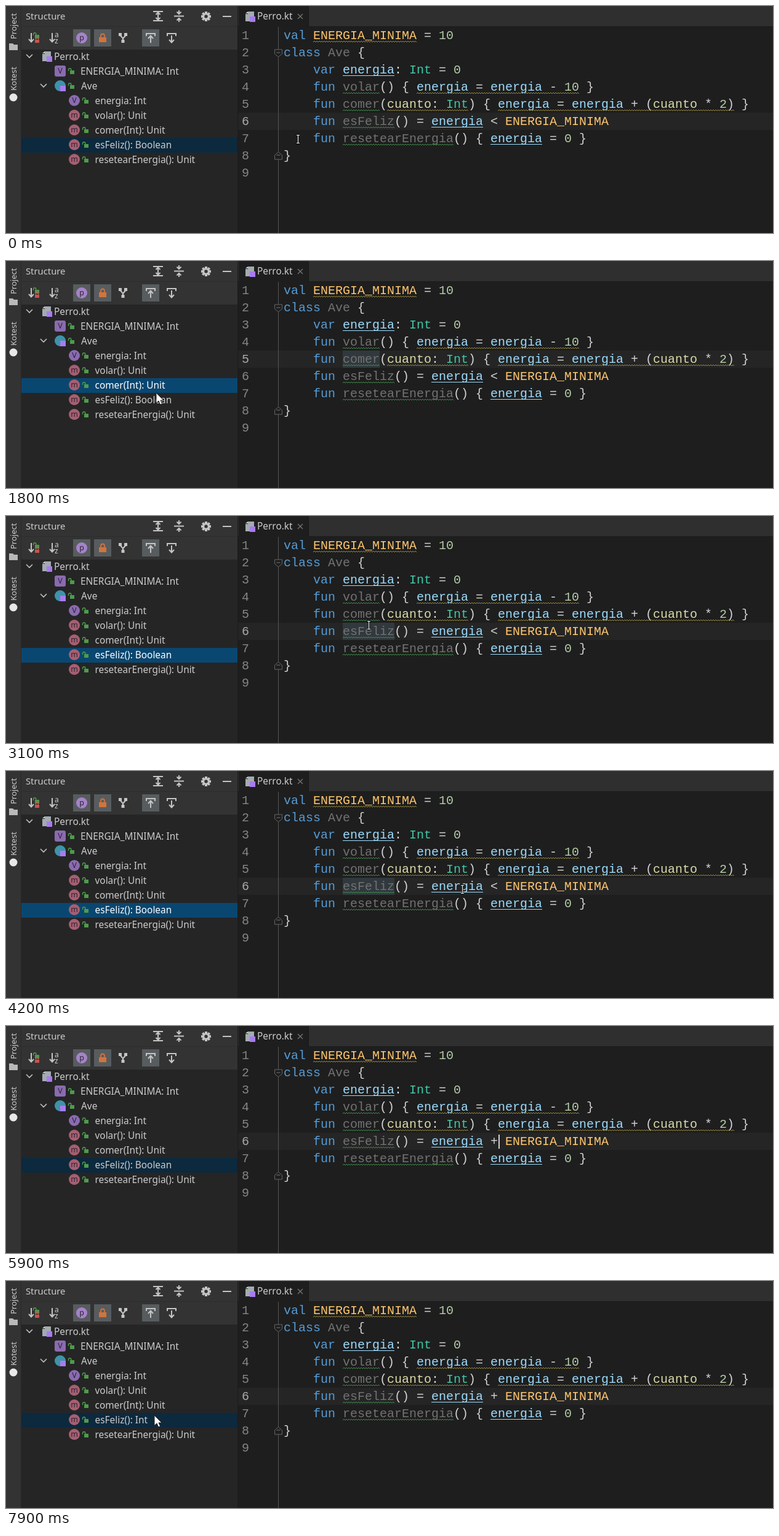
Write an HTML page that moves like this. It is 1246 px wide and 370 px high and loops after 8000 ms.

```html
<!DOCTYPE html>
<html lang="es">
<head>
<meta charset="utf-8">
<title>Structure</title>
<style>
html, body { margin: 0; width: 100%; height: 100%; overflow: hidden; background: #1e1e1e; }
svg { display: block; width: 1246px; height: 370px; }
text { white-space: pre; }
.ui { font: 15.4px "Noto Sans", sans-serif; fill: #ccc; }
.code { font: 20px "Liberation Mono", monospace; }
.letter { font: 12.5px "Noto Sans", sans-serif; text-anchor: middle; fill: #2b2430; }
.line { fill: none; stroke: #c5c5c5; stroke-width: 2; }
</style>
</head>
<body>
<svg id="stage" viewBox="0 0 1246 370" xmlns="http://www.w3.org/2000/svg"></svg>
<script>
const LOOP = 8000, STEP = 100;
const CODE_X = 451, COL = 12, LINE_H = 28, TOP = 34;
const colors = {
  k: '#569cd6', g: '#727272', d: '#d4d4d4', c: '#ffc66d', t: '#3ec9a7',
  n: '#b5cea8', v: '#9cdcfe', p: '#dcdcaa'
};

// Each token: column, colour key, text
const code = [
  [[0, 'k', 'val'], [4, 'c', 'ENERGIA_MINIMA'], [19, 'd', '='], [21, 'n', '10']],
  [[0, 'k', 'class'], [6, 'g', 'Ave'], [10, 'd', '{']],
  [[4, 'k', 'var'], [8, 'v', 'energia'], [15, 'd', ':'], [17, 't', 'Int'], [21, 'd', '='], [23, 'n', '0']],
  [[4, 'k', 'fun'], [8, 'g', 'volar'], [13, 'd', '() {'], [18, 'v', 'energia'], [26, 'd', '='],
   [28, 'v', 'energia'], [36, 'd', '-'], [38, 'n', '10'], [41, 'd', '}']],
  [[4, 'k', 'fun'], [8, 'g', 'comer'], [13, 'd', '('], [14, 'p', 'cuanto'], [20, 'd', ':'], [22, 't', 'Int'],
   [25, 'd', ') {'], [29, 'v', 'energia'], [37, 'd', '='], [39, 'v', 'energia'], [47, 'd', '+ ('],
   [50, 'p', 'cuanto'], [57, 'd', '*'], [59, 'n', '2'], [60, 'd', ') }']],
  [[4, 'k', 'fun'], [8, 'g', 'esFeliz'], [15, 'd', '() ='], [20, 'v', 'energia']],
  [[4, 'k', 'fun'], [8, 'g', 'resetearEnergia'], [23, 'd', '() {'], [28, 'v', 'energia'],
   [36, 'd', '='], [38, 'n', '0'], [40, 'd', '}']],
  [[0, 'd', '}']],
  []
];

// line, column, length
const unusedWaves = [[4, 8, 5], [5, 8, 5], [6, 8, 7], [7, 8, 15]];
const hintWaves = [[1, 4, 14], [4, 18, 22], [5, 14, 11], [5, 29, 32]];
const underlines = [[3, 8, 7], [6, 20, 7], [7, 28, 7]];

const colX = col => CODE_X + col * COL;
const lineMid = n => TOP + LINE_H * (n - 0.5);
const rowMid = n => 83 + 24 * n;

const rect = (x, y, w, h, fill, more = '') =>
  `<rect x="${x}" y="${y}" width="${w}" height="${h}" fill="${fill}" ${more}/>`;
const path = (d, more = 'class="line"') => `<path d="${d}" ${more}/>`;
const label = (x, y, s, more = '') => `<text class="ui" x="${x}" y="${y}" ${more}>${s}</text>`;
const at = (x, y, body) => `<g transform="translate(${x} ${y})">${body}</g>`;
const token = (line, [col, key, s], id = '') =>
  `<text class="code" ${id} x="${colX(col)}" y="${lineMid(line) + 6}" fill="${colors[key]}">${s}</text>`;

function wave([line, col, len], color) {
  const y = lineMid(line) + 11;
  let d = `M${colX(col)} ${y}`;
  for (let i = 0; i < len * COL / 4; i++) d += 'l2 -2l2 2';
  return path(d, `fill="none" stroke="${color}" stroke-width="1"`);
}

const chevron = (x, y) => path(`M${x - 5} ${y - 3}l5 5 5-5`, 'fill="none" stroke="#c0c0c0" stroke-width="1.6"');
const openLock = (x, y) => at(x, y,
  rect(-2, -1, 7, 6, '#4f9a4c') +
  path('M-4.5 0v-2a2.2 2.2 0 0 1 4.4 0v2', 'fill="none" stroke="#4f9a4c" stroke-width="1.4"'));
const fileIcon = (x, y) => at(x, y,
  path('M-3 -8H7V1H1V8H-7V-4H-3z', 'fill="#a3abb0"') +
  path('M-7 -5l4-3v3z', 'fill="#d0d4d7"') + rect(0, 0, 9, 9, '#a97bf0'));
const badge = (x, y, s, fill, square) =>
  (square ? rect(x - 9, y - 9, 18, 18, fill, 'rx="3"') : `<circle cx="${x}" cy="${y}" r="9" fill="${fill}"/>`) +
  `<text class="letter" x="${x}" y="${y + 4}">${s}</text>`;
const button = x => rect(x, 38, 28, 28, '#575c5f');

function leftBar() {
  return rect(0, 0, 25, 370, '#333') + rect(24, 0, 1, 370, '#2a2a2a') +
    label(0, 0, 'Project', 'transform="translate(17 54) rotate(-90)" style="font-size:13px"') +
    path('M5 61h6l2 2h6v9H5z', 'fill="#b9b9b9"') +
    label(0, 0, 'Kotest', 'transform="translate(17 138) rotate(-90)" style="font-size:13px"') +
    '<circle cx="12" cy="149" r="6.5" fill="#e8e8e8"/>';
}

function toolbar() {
  let s = rect(25, 0, 352, 71, '#333') + rect(25, 33, 352, 1, '#2d2d2d') + label(32, 22, 'Structure', 'style="font-size:14.8px"');
  s += path('M239 9h16M239 24h16M247 11v11M243.500 14l3.500-3.500 3.500 3.500M243.500 19l3.500 3.500 3.500-3.500');
  s += path('M273 16.500h16M281 7v5M281 26v-5M277.500 9.500l3.500 3.500 3.500-3.500M277.500 23.500l3.500-3.500 3.500 3.500');
  let teeth = '';
  for (let i = 0; i < 4; i++) teeth += rect(-2, -8, 4, 16, '#c5c5c5', `transform="rotate(${i * 45})"`);
  s += at(325, 17, teeth + '<circle r="4.200" fill="#333" stroke="#c5c5c5" stroke-width="3"/>');
  s += path('M352 17h14');
  const down = x => path(`M${x} 44v14M${x - 4} 54l4 4.500 4-4.500`);
  s += down(41) + openLock(49, 48) + rect(47, 55, 7, 5, '#c75450') +
    path('M48.500 55v-2a2 2 0 0 1 4 0v2', 'fill="none" stroke="#c75450" stroke-width="1.300"');
  s += down(75) + label(79, 51, 'a', 'style="font-size:12px"') + label(79, 61, 'z', 'style="font-size:12px"');
  s += button(109) + badge(123, 52, 'p', '#a583c9');
  s += button(143) + rect(151, 51, 12, 8, '#d0743c') +
    path('M154 51v-2.500a3 3 0 0 1 6 0v2.500', 'fill="none" stroke="#d0743c" stroke-width="1.800"');
  s += path('M190 59v-6l-5-6M190 53l5-6') + rect(183, 44, 5, 5, '#c5c5c5') +
    rect(192, 44, 5, 5, '#c5c5c5') + rect(187.5, 55, 5, 5, '#c5c5c5');
  s += button(221) + path('M228 49v-4h14v4M235 60V49M231 53l4-4.500 4 4.500');
  s += path('M262 49v-4h14v4M269 48v11M265 55l4 4.500 4-4.500');
  return s;
}

function tree() {
  const purple = '#8a6bb0', rose = '#a65f72';
  const members = [['V', purple, 'energia: Int'], ['m', rose, 'volar(): Unit'], ['m', rose, 'comer(Int): Unit'],
    ['m', rose, 'esFeliz(): Boolean'], ['m', rose, 'resetearEnergia(): Unit']];
  let s = rect(25, 71, 351, 299, '#252526') + rect(25, 215, 351, 24, '#0c293e', 'id="sel"');
  s += chevron(38, 82) + fileIcon(66, 82) + label(78, 88, 'Perro.kt');
  s += badge(88, 106, 'V', purple, true) + openLock(106, 106) + label(121, 112, 'ENERGIA_MINIMA: Int');
  s += chevron(61, 130) + '<circle cx="88" cy="130" r="9" fill="#3e93a8"/>' + rect(88, 130, 9, 9, '#a97bf0') +
    openLock(106, 130) + label(122, 136, 'Ave');
  members.forEach(([letter, fill, text], i) => {
    const y = rowMid(i + 3) - 1;
    s += badge(111, y, letter, fill) + openLock(129, y) + label(144.5, y + 5.5, text, `id="row${i}"`);
  });
  return s + rect(376, 0, 1, 370, '#1b1b1b');
}

function editor() {
  let s = rect(377, 0, 869, 370, '#1e1e1e') + rect(377, 0, 869, 33, '#2f2f2f') +
    rect(378, 0, 113, 34, '#1e1e1e') + rect(491, 0, 1, 33, '#191919') + rect(492, 33, 754, 1, '#1a1a1a');
  s += fileIcon(396, 17) + label(408, 22, 'Perro.kt') +
    path('M474 13l8 8M482 13l-8 8', 'stroke="#777" stroke-width="1.200"');
  s += rect(377, 174, 869, 28, '#252525', 'id="current"') + rect(547, 174, 84, 28, '#31393e', 'id="word"');
  s += rect(442, 34, 1, 336, '#555');
  const fold = (y, dir) => at(442.5, y,
    path(`M-6 ${-6 * dir}H6V${dir}L0 ${6 * dir}L-6 ${dir}z`, 'fill="#1e1e1e" stroke="#666"') +
    path('M-3 -1H3', 'stroke="#777"'));
  s += fold(77, 1) + fold(244, -1);
  code.forEach((tokens, i) => {
    s += `<text class="code" id="num${i + 1}" x="383" y="${lineMid(i + 1) + 6}" fill="#858585">${i + 1}</text>`;
    tokens.forEach(t => { s += token(i + 1, t); });
  });
  s += token(6, [28, 'd', '&lt;'], 'id="op"') + token(6, [30, 'c', 'ENERGIA_MINIMA'], 'id="tail"');
  unusedWaves.forEach(w => { s += wave(w, '#3f8f4a'); });
  hintWaves.forEach(w => { s += wave(w, '#9a8a3c'); });
  underlines.forEach(([line, col, len]) => { s += rect(colX(col), lineMid(line) + 9, len * COL, 1, '#9cdcfe'); });
  return s + rect(788, 177, 2, 23, '#d0d0d0', 'id="caret"');
}

const pointers =
  path('M0 0V16.500L4 13l2.600 6 3-1.300-2.600-5.700H12z', 'id="arrow" fill="#fff" stroke="#222" stroke-width="1"') +
  '<g id="beam">' + path('M-3 -7H3M0 -7V7M-3 7H3', 'fill="none" stroke="#111" stroke-width="3"') +
  path('M-2.500 -6.500H2.500M0 -6.500V6.500M-2.500 6.500H2.500', 'fill="none" stroke="#eee" stroke-width="1.200"') + '</g>';

document.getElementById('stage').innerHTML = leftBar() + toolbar() + tree() + editor() + pointers;
const el = id => document.getElementById(id);
const set = (id, attrs) => { for (const k in attrs) el(id).setAttribute(k, attrs[k]); };
const show = (id, on) => set(id, { visibility: on ? 'visible' : 'hidden' });

// Pointer route: time, x, y
const route = [
  [0, 474, 217], [200, 333, 200], [300, 333, 200], [500, 268, 215], [700, 234, 219], [1000, 247, 195],
  [1500, 247, 195], [1800, 244, 215], [2700, 244, 215], [2800, 241, 215], [3100, 589, 178], [3300, 622, 180],
  [3600, 577, 190], [4000, 692, 190], [4100, 692, 190], [4400, 838, 199], [4500, 838, 199], [4700, 792, 196],
  [6400, 792, 196], [6700, 750, 240], [6900, 692, 270], [7000, 692, 270], [7300, 400, 262], [7500, 220, 245],
  [7600, 170, 234], [7900, 241, 219], [8000, 241, 219]
];

function pointerAt(t) {
  const i = route.findIndex(p => p[0] > t);
  const [t0, x0, y0] = route[i - 1], [t1, x1, y1] = route[i];
  const f = (t - t0) / (t1 - t0);
  return [Math.round(x0 + (x1 - x0) * f), Math.round(y0 + (y1 - y0) * f)];
}

const within = (t, a, b) => t >= a && t < b;

function draw(t) {
  const [x, y] = pointerAt(t);
  const visible = !within(t, 5700, 6500);
  const place = { transform: `translate(${x} ${y})` };
  set('arrow', place);
  set('beam', { transform: `translate(${x + 0.5} ${y})` });
  show('arrow', visible && x < 443);
  show('beam', visible && x >= 443);

  const focused = within(t, 1200, 4900);
  const row = within(t, 1200, 2200) ? 2 : 3;
  set('sel', { y: 143 + 24 * row, fill: focused ? '#094771' : '#0c293e' });
  for (let i = 0; i < 5; i++) el('row' + i).style.fill = focused && i === row ? '#fff' : '';
  el('row3').textContent = 'esFeliz(): ' + (t < 6200 ? 'Boolean' : 'Int');

  const line = within(t, 1300, 2300) ? 5 : 6;
  const top = TOP + LINE_H * (line - 1);
  set('current', { y: top });
  set('word', { y: top, width: (line === 5 ? 5 : 7) * COL });
  show('word', within(t, 1300, 4900));
  for (let i = 5; i < 7; i++) set('num' + i, { fill: i === line ? '#a8a8a8' : '#858585' });

  const gap = within(t, 5700, 5900);
  el('op').textContent = t < 5700 ? '<' : gap ? '' : '+';
  set('tail', { x: colX(gap ? 29 : 30) });
  set('caret', { x: t < 5400 || gap ? 788 : 800 });
  show('caret', within(t, 4900, 6500) || within(t, 7100, 7600));
}

const start = performance.now();
let last = -1;
function tick() {
  const t = Math.floor(((performance.now() - start) % LOOP) / STEP) * STEP;
  if (t !== last) draw(last = t);
  requestAnimationFrame(tick);
}
tick();
</script>
</body>
</html>
```
